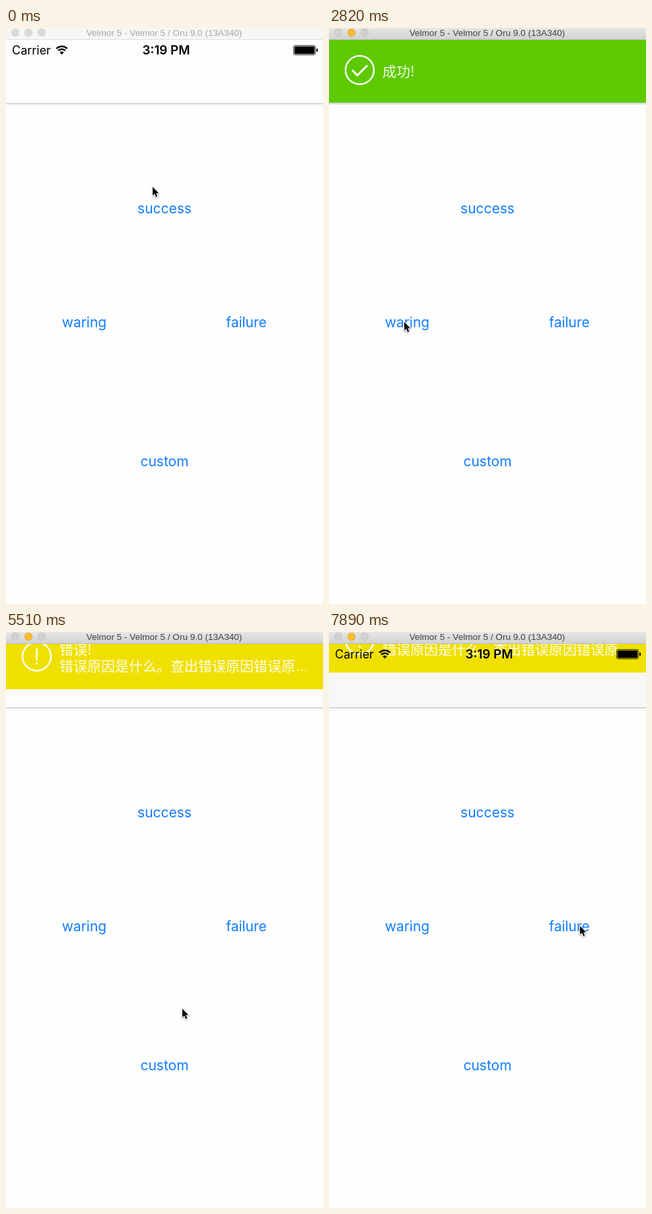
Animation of 480 by 870 pixels, one loop 8 s. Source, as an HTML page with a canvas:

```html
<!DOCTYPE html>
<html lang="en">
<head>
<meta charset="utf-8">
<title>Banner alerts</title>
<style>
  html, body { margin: 0; width: 100%; height: 100%; overflow: hidden; background: #fefefe; }
  canvas { display: block; width: 480px; height: 870px; }
</style>
</head>
<body>
<canvas id="stage" width="480" height="870"></canvas>
<script>
const ctx = document.getElementById('stage').getContext('2d');
const LOOP = 8000, STEP = 148.8, SLIDE = 855;
const BAR_H = 17, BANNER_BOTTOM = 113, BANNER_H = 96;
const UI = 'Inter, sans-serif';
const CJK = '300 21px "Noto Sans CJK SC Light", "Noto Sans CJK SC", "Noto Sans CJK", sans-serif';
const BANNER_INK = 'rgba(255,255,255,.92)';

// Steps of tap and dismissal; rise is when the slide-in starts, in ms.
const BANNERS = [
  { tap: 8, rise: 1260, leave: 25, color: '#5fc900', icon: drawCheck, lines: [['成功!', 73]] },
  { tap: 33, rise: 4962, leave: 50, color: '#f0e000', icon: drawBang,
    lines: [['错误!', 61], ['错误原因是什么。查出错误原因错误原', 86]], more: true }
];

const BUTTONS = [
  { label: 'success', x: 240, y: 280, tap: 8 },
  { label: 'waring', x: 118.5, y: 452, tap: 33 },
  { label: 'failure', x: 364, y: 452 },
  { label: 'custom', x: 240, y: 662 }
];

// Pointer path: step, x, y
const PATH = [
  [0, 222, 240], [1, 224, 253], [2, 226, 270], [3, 226, 280],
  [9, 226, 280], [12, 218, 305], [15, 159, 409], [17, 124, 437],
  [18, 114, 442], [19, 114, 444], [20, 118, 444], [34, 118, 444],
  [35, 150, 482], [36, 213, 550], [37, 267, 569], [38, 320, 543],
  [39, 367, 491], [40, 388, 455], [41, 380, 444], [54, 380, 444]
];

const clamp = v => Math.min(1, Math.max(0, v));

// cubic-bezier(.42, 0, .58, 1), solved for x by bisection
function ease(v) {
  const x = clamp(v);
  let lo = 0, hi = 1, s = 0.5;
  for (let i = 0; i < 24; i++) {
    s = (lo + hi) / 2;
    const bx = 1.26 * (1 - s) ** 2 * s + 1.74 * (1 - s) * s * s + s ** 3;
    if (bx < x) lo = s; else hi = s;
  }
  return x === 0 || x === 1 ? x : s * s * (3 - 2 * s);
}

function text(str, x, y, font, color, align = 'left') {
  ctx.font = font;
  ctx.fillStyle = color;
  ctx.textAlign = align;
  ctx.fillText(str, x, y);
}

function rect(x, y, w, h, color) {
  ctx.fillStyle = color;
  ctx.fillRect(x, y, w, h);
}

function disc(x, y, r, color) {
  ctx.fillStyle = color;
  ctx.beginPath();
  ctx.arc(x, y, r, 0, Math.PI * 2);
  ctx.fill();
}

function line(points, width, color) {
  ctx.lineWidth = width;
  ctx.strokeStyle = color;
  ctx.beginPath();
  points.forEach(([x, y]) => ctx.lineTo(x, y));
  ctx.stroke();
}

function drawCheck() {
  line([[-11.5, 0], [-3.5, 8], [11.5, -7]], 3, '#fff');
}

function drawBang() {
  line([[0, -12], [0, 6]], 2.4, '#fff');
  disc(0, 10.5, 1.6, '#fff');
}

function drawTitleBar(active) {
  const fill = ctx.createLinearGradient(0, 0, 0, BAR_H);
  fill.addColorStop(0, active ? '#e6e6e6' : '#f6f6f6');
  fill.addColorStop(1, active ? '#d2d2d2' : '#f6f6f6');
  rect(0, 0, 480, BAR_H, fill);
  rect(0, BAR_H, 480, 1, active ? '#bcbcbc' : '#dedede');
  [14, 34, 54].forEach(x => {
    const lit = active && x === 34;
    disc(x, 7, 6, lit ? '#dfa023' : active ? '#bebebe' : '#d0d0d0');
    disc(x, 7, 5.2, lit ? '#fdbd2f' : active ? '#d0d0d0' : '#dadada');
  });
  text('Velmor 5 - Velmor 5 / Oru 9.0 (13A340)', 239.5, 12,
    '13.6px "Liberation Sans", sans-serif', active ? '#404040' : '#a6a6a6', 'center');
}

function drawStatus() {
  text('Carrier', 9, 40, '18px ' + UI, '#000');
  text('3:19 PM', 242.5, 40, '600 18.8px ' + UI, '#000', 'center');

  ctx.lineWidth = 2.5;
  ctx.strokeStyle = ctx.fillStyle = '#000';
  const from = -Math.PI * 0.75, to = -Math.PI * 0.25;
  [11.7, 7.6].forEach(r => {
    ctx.beginPath();
    ctx.arc(84.5, 39.5, r, from, to);
    ctx.stroke();
  });
  ctx.beginPath();
  ctx.moveTo(84.5, 40);
  ctx.arc(84.5, 40, 4.4, from, to);
  ctx.fill();

  ctx.lineWidth = 0.8;
  ctx.beginPath();
  ctx.roundRect(435.4, 26.4, 33.2, 14.2, 2.5);
  ctx.stroke();
  ctx.beginPath();
  ctx.roundRect(436.7, 27.7, 30.6, 11.6, 1.4);
  ctx.roundRect(470, 31, 2, 5, 1);
  ctx.fill();
}

function drawBanner(b, lift) {
  ctx.save();
  ctx.beginPath();
  ctx.rect(0, BAR_H, 480, BANNER_BOTTOM);
  ctx.clip();
  ctx.translate(0, -lift);
  rect(0, BANNER_BOTTOM - BANNER_H, 480, BANNER_H, b.color);
  b.lines.forEach(([str, y]) => text(str, 81, y, CJK, BANNER_INK));
  if (b.more) text('...', 439, 86, '300 21px ' + UI, BANNER_INK);
  ctx.translate(46.5, 63.5);
  ctx.lineWidth = 2.4;
  ctx.strokeStyle = '#fff';
  ctx.beginPath();
  ctx.arc(0, 0, 21.5, 0, Math.PI * 2);
  ctx.stroke();
  b.icon();
  ctx.restore();
}

function drawPointer(step) {
  const i = PATH.findIndex(p => p[0] > step);
  const [s0, x0, y0] = PATH[i - 1], [s1, x1, y1] = PATH[i];
  const f = (step - s0) / (s1 - s0);
  ctx.save();
  ctx.translate(x0 + (x1 - x0) * f, y0 + (y1 - y0) * f);
  ctx.beginPath();
  [[0, 0], [0, 13], [3, 10.3], [5.2, 15.2], [7.4, 14.2], [5.3, 9.5], [9.3, 9.5]]
    .forEach(([x, y]) => ctx.lineTo(x, y));
  ctx.closePath();
  ctx.lineJoin = 'round';
  ctx.lineWidth = 2;
  ctx.strokeStyle = '#fff';
  ctx.shadowColor = 'rgba(0,0,0,.4)';
  ctx.shadowBlur = 2.5;
  ctx.shadowOffsetY = 1;
  ctx.stroke();
  ctx.shadowColor = 'transparent';
  ctx.fillStyle = '#000';
  ctx.fill();
  ctx.restore();
}

function draw(now) {
  const step = Math.min(53, Math.floor((now % LOOP + 10) / STEP));
  const time = step * STEP;
  const leaving = BANNERS.some(b => step >= b.leave && step < b.leave + 8);
  const covered = BANNERS.some(b => step >= b.tap && step < b.leave);

  rect(0, 0, 480, 870, '#fefefe');
  rect(0, BAR_H, 480, 97, leaving ? '#f8f8f8' : '#fdfdfd');
  rect(0, 114, 480, 1, '#b8b8b8');

  BUTTONS.forEach(b => {
    const tapped = b.tap !== undefined && step >= b.tap;
    ctx.globalAlpha = tapped ? 0.25 + 0.75 * ease((time - b.tap * STEP) / 450) : 1;
    text(b.label, b.x, b.y, '21px ' + UI, '#117cff', 'center');
  });
  ctx.globalAlpha = 1;

  BANNERS.forEach(b => {
    const shown = ease((time - b.rise) / SLIDE);
    const gone = ease((time - b.leave * STEP) / SLIDE);
    if (shown > gone) drawBanner(b, BANNER_H * (1 - shown + gone));
  });
  if (!covered) drawStatus();
  drawTitleBar(step >= 8);
  drawPointer(step);
}

const start = performance.now();
function tick() {
  draw(performance.now() - start);
  requestAnimationFrame(tick);
}
tick();
</script>
</body>
</html>
```
